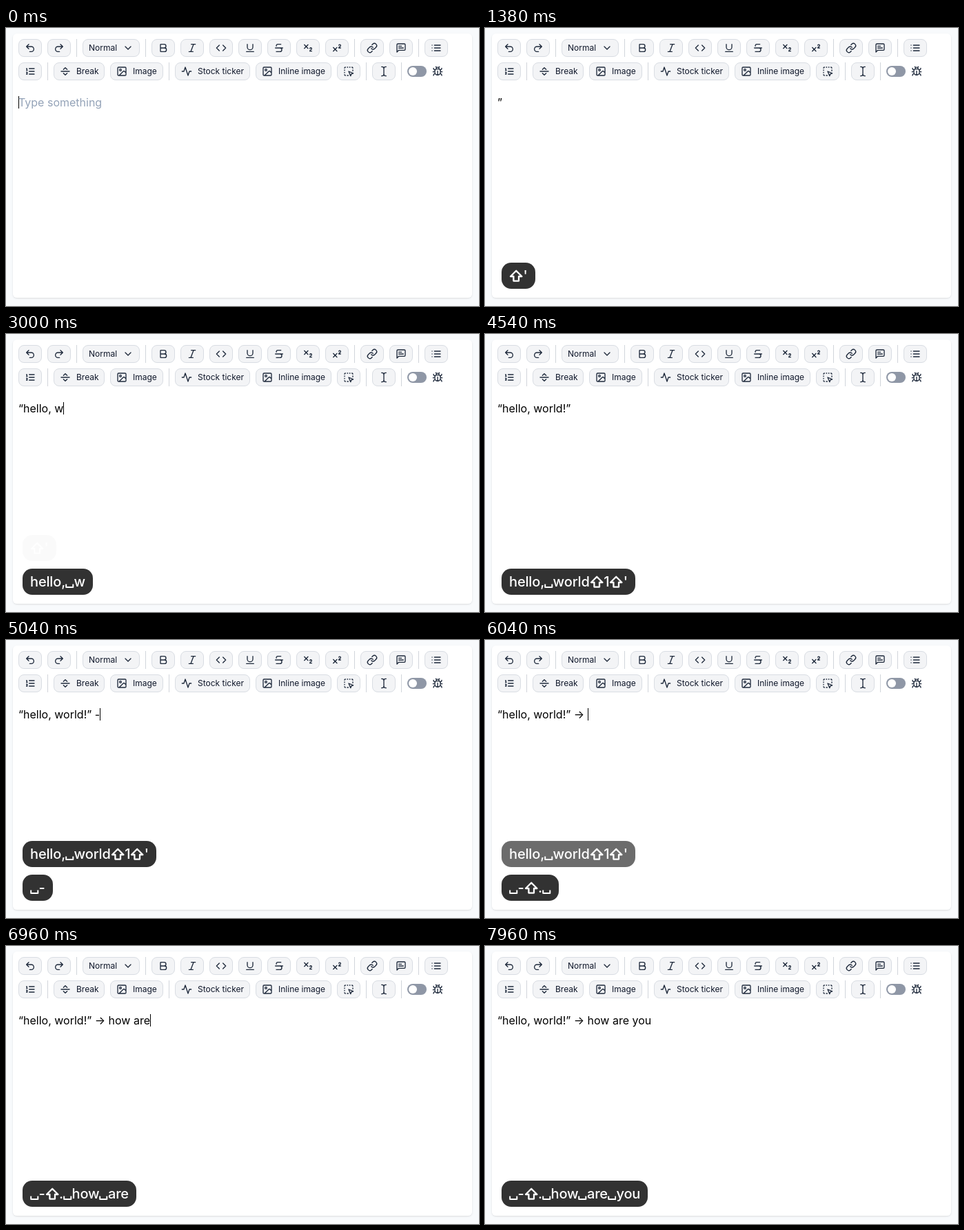
An HTML page for the animation above (8000 ms loop, 686x404 px).

```html
<!DOCTYPE html>
<html lang="en">
<head>
<meta charset="utf-8">
<title>Rich text editor</title>
<style>
  html, body { margin: 0; width: 100%; height: 100%; overflow: hidden; background: #f8fafc; }
  body { position: relative; font-family: Inter, sans-serif; }
  #ui { position: absolute; left: 0; top: 0; display: block; }
  #ui text { font: 400 12px Inter, sans-serif; fill: #0f172a; }
  .btn { fill: #f3f4f6; stroke: #d9dde3; }
  .sep { fill: #d1d5db; }
  .icon { fill: none; stroke: #1e293b; stroke-width: 2; stroke-linecap: round; stroke-linejoin: round; }
  #line { position: absolute; left: 18px; top: 99px; font-size: 16px; line-height: 19px; white-space: pre; color: #000; }
  #caret { position: absolute; top: 0; width: 1px; height: 18px; background: #000; }
  #hint { position: absolute; left: 0; top: 0; color: #94a3b8; }
  .pill { position: absolute; left: 24px; height: 38px; padding: 0 11px; border-radius: 14px; box-sizing: border-box;
    background: #323232; color: #fff; font-size: 20px; line-height: 38px; font-weight: 500; letter-spacing: -.15px; white-space: pre; }
  .pill svg { display: inline-block; height: 38px; vertical-align: top; fill: none; stroke: #fff; stroke-linejoin: round; }
</style>
</head>
<body>
<svg id="ui" width="686" height="404" viewBox="0 0 686 404"></svg>
<div id="line"><span id="typed"></span><span id="caret"></span><span id="hint">Type something</span></div>
<div id="pills"></div>
<script>
const LOOP = 8000, BLINK = 500, LAG = 20;
const $ = id => document.getElementById(id);

// 24-unit icon paths
const picture = 'M5 3h14a2 2 0 0 1 2 2v14a2 2 0 0 1-2 2H5a2 2 0 0 1-2-2V5a2 2 0 0 1 2-2zM11 9a2 2 0 1 1-4 0a2 2 0 1 1 4 0M21 15l-3.1-3.1a2 2 0 0 0-2.8 0L6 21';
const icons = {
  undo: 'M9 14 4 9l5-5M4 9h10.5a5.5 5.5 0 0 1 0 11H11',
  redo: 'm15 14 5-5-5-5M20 9H9.5a5.5 5.5 0 0 0 0 11H13',
  down: 'm6 9 6 6 6-6',
  bold: 'M6 12h9a4 4 0 0 1 0 8H7a1 1 0 0 1-1-1V5a1 1 0 0 1 1-1h7a4 4 0 0 1 0 8',
  italic: 'M19 4h-9M14 20H5M15 4 9 20',
  code: 'm16 18 6-6-6-6M8 6l-6 6 6 6',
  underline: 'M6 4v6a6 6 0 0 0 12 0V4M4 20h16',
  strike: 'M16 4H9a3 3 0 0 0-2.83 4M14 12a4 4 0 0 1 0 8H6M4 12h16',
  sub: 'm4 5 8 8M12 5l-8 8M20 19h-4c0-1.5.44-2 1.5-2.5S20 15.33 20 14a2 2 0 0 0-4-.7',
  sup: 'm4 19 8-8M12 19l-8-8M20 12h-4c0-1.5.44-2 1.5-2.5S20 8.33 20 7a2 2 0 0 0-4-.7',
  link: 'M10 13a5 5 0 0 0 7.54.54l3-3a5 5 0 0 0-7.07-7.07l-1.72 1.71M14 11a5 5 0 0 0-7.54-.54l-3 3a5 5 0 0 0 7.07 7.07l1.71-1.71',
  note: 'M21 15a2 2 0 0 1-2 2H7l-4 4V5a2 2 0 0 1 2-2h14a2 2 0 0 1 2 2zM13 8H7M17 12H7',
  list: 'M8 6h13M8 12h13M8 18h13M3 6h.01M3 12h.01M3 18h.01',
  ordered: 'M10 6h11M10 12h11M10 18h11M4 6h1v4M4 10h2M6 18H4c0-1 2-2 2-3s-1-1.5-2-1',
  split: 'M3 12h18M8 8l4-4 4 4M16 16l-4 4-4-4',
  picture,
  pulse: 'M22 12h-4l-3 9L9 3l-3 9H2',
  select: 'M5 3a2 2 0 0 0-2 2M19 3a2 2 0 0 1 2 2M5 21a2 2 0 0 1-2-2M9 3h1M9 21h2M14 3h1M3 9v1M21 9v2M3 14v1M12 12l4.2 10 1.5-4.3L22 16.2z',
  cursor: 'M17 22h-1a4 4 0 0 1-4-4V6a4 4 0 0 1 4-4h1M7 22h1a4 4 0 0 0 4-4M7 2h1a4 4 0 0 1 4 4',
  bug: 'm8 2 1.88 1.88M14.12 3.88 16 2M9 7.13v-1a3 3 0 1 1 6 0v1M12 20a6 6 0 0 1-6-6v-3a4 4 0 0 1 4-4h4a4 4 0 0 1 4 4v3a6 6 0 0 1-6 6M12 20v-9M6.53 9C4.6 8.8 3 7.1 3 5M6 13H2M3 21c0-2.1 1.7-3.9 3.8-4M20.97 5c0 2.1-1.6 3.8-3.5 4M22 13h-4M17.2 17c2.1.1 3.8 1.9 3.8 4'
};

const icon = (name, cx, cy) =>
  `<path class="icon" transform="translate(${cx - 8} ${cy - 8}) scale(.66667)" d="${icons[name]}"/>`;
const box = (x, y, w) => `<rect class="btn" x="${x + .5}" y="${y + .5}" width="${w - 1}" height="25" rx="7.5"/>`;
const button = (name, x, y) => box(x, y, 34) + icon(name, x + 17, y + 13);
const labelled = (name, label, x, y, w) =>
  box(x, y, w) + icon(name, x + 17, y + 13) + `<text x="${x + 33}" y="${y + 17}">${label}</text>`;
const sep = (x, y) => `<rect class="sep" x="${x}" y="${y}" width="1" height="26"/>`;
const run = (names, x, y) => names.split(' ').map((n, i) => button(n, x + i * 42, y)).join('');

$('ui').innerHTML = `
  <defs><filter id="soft" x="-5%" y="-5%" width="110%" height="110%">
    <feDropShadow dx="0" dy="1" stdDeviation="1" flood-opacity=".12"/></filter></defs>
  <rect x="10" y="8" width="666" height="384" rx="6" fill="#fff" filter="url(#soft)"/>` +
  run('undo redo', 18, 16) + sep(102, 16) +
  box(111, 16, 83) + '<text x="120" y="33">Normal</text>' + icon('down', 177, 29) + sep(202, 16) +
  run('bold italic code underline strike sub sup', 211, 16) + sep(505, 16) +
  run('link note', 514, 16) + sep(598, 16) + button('list', 607, 16) +
  button('ordered', 18, 50) + sep(60, 50) +
  labelled('split', 'Break', 69, 50, 74) + labelled('picture', 'Image', 151, 50, 77) + sep(236, 50) +
  labelled('pulse', 'Stock ticker', 245, 50, 109) + labelled('picture', 'Inline image', 362, 50, 110) +
  button('select', 480, 50) + sep(522, 50) + button('cursor', 531, 50) + sep(573, 50) +
  '<rect x="582" y="55" width="28" height="16" rx="8" fill="#8f97a6"/><circle cx="590" cy="63" r="6" fill="#fff"/>' +
  icon('bug', 626, 63);

// [time, line of text after the key, keys shown]
const hello = '“hello, world!”', arrow = hello + ' → ';
const keys = [[812, '”', "⇧'"]];
const type = (base, chars, times) => times.forEach((t, i) =>
  keys.push([t, base + chars.slice(0, i + 1), chars[i] === ' ' ? '␣' : chars[i]]));
type('“', 'hello, world', [1815, 1950, 2060, 2225, 2450, 2650, 2820, 2950, 3070, 3155, 3240, 3350]);
keys.push([3745, '“hello, world!', '⇧1'], [4015, hello, "⇧'"], [4740, hello + ' ', '␣'],
  [5020, hello + ' -', '-'], [5450, hello + ' →', '⇧.'], [5950, arrow, '␣']);
type(arrow, 'how are you', [6350, 6450, 6560, 6650, 6735, 6820, 6900, 6980, 7200, 7405, 7430]);

// A pause between keys starts a new pill
const PAUSE = 600, HOLD = 1962, FADE = 225, LINGER = 165;
const groups = [];
keys.forEach((k, i) => {
  if (!i || k[0] - keys[i - 1][0] > PAUSE) groups.push([]);
  groups[groups.length - 1].push(k);
});

const glyphs = {
  '␣': '<svg width="12.5" viewBox="0 0 12.5 38"><path stroke-width="2" d="M1.2 22.5v4.5h10.1v-4.5"/></svg>',
  '⇧': '<svg width="20.5" viewBox="0 0 20.5 38"><path stroke-width="2.3" d="M10.2 11.8 18.4 20H14v6.6H6.4V20H2z"/></svg>'
};
const pills = groups.map(() => {
  const el = document.createElement('div');
  el.className = 'pill';
  return $('pills').appendChild(el);
});

function set(el, html) {
  if (el.shown !== html) el.innerHTML = el.shown = html;
}

function drawPills(t) {
  groups.forEach((group, i) => {
    const el = pills[i], next = groups[i + 1];
    const stale = next && t >= next[0][0];
    const age = t - group[group.length - 1][0] - HOLD;
    const visible = t >= group[0][0] && !(stale && age > FADE + LINGER);
    el.style.display = visible ? 'block' : 'none';
    if (!visible) return;
    const cast = group.filter(k => k[0] <= t).map(k => k[2]).join('');
    set(el, cast.replace(/[␣⇧]/g, c => glyphs[c]));
    el.style.top = (stale ? 292 : 341) + 'px';
    el.style.opacity = stale ? Math.min(1, Math.max(.02, 1 - age / FADE)) : 1;
  });
}

function draw(t) {
  const done = keys.filter(k => k[0] + LAG <= t);
  const last = done[done.length - 1];
  set($('typed'), last ? last[1] : '');
  $('hint').style.display = last ? 'none' : 'inline';
  const since = last ? t - last[0] - LAG : t + 420;
  $('caret').style.visibility = Math.floor(since / BLINK) % 2 ? 'hidden' : 'visible';
  drawPills(t);
}

const start = performance.now();
function tick() {
  draw((performance.now() - start) % LOOP);
  requestAnimationFrame(tick);
}
tick();
</script>
</body>
</html>
```
